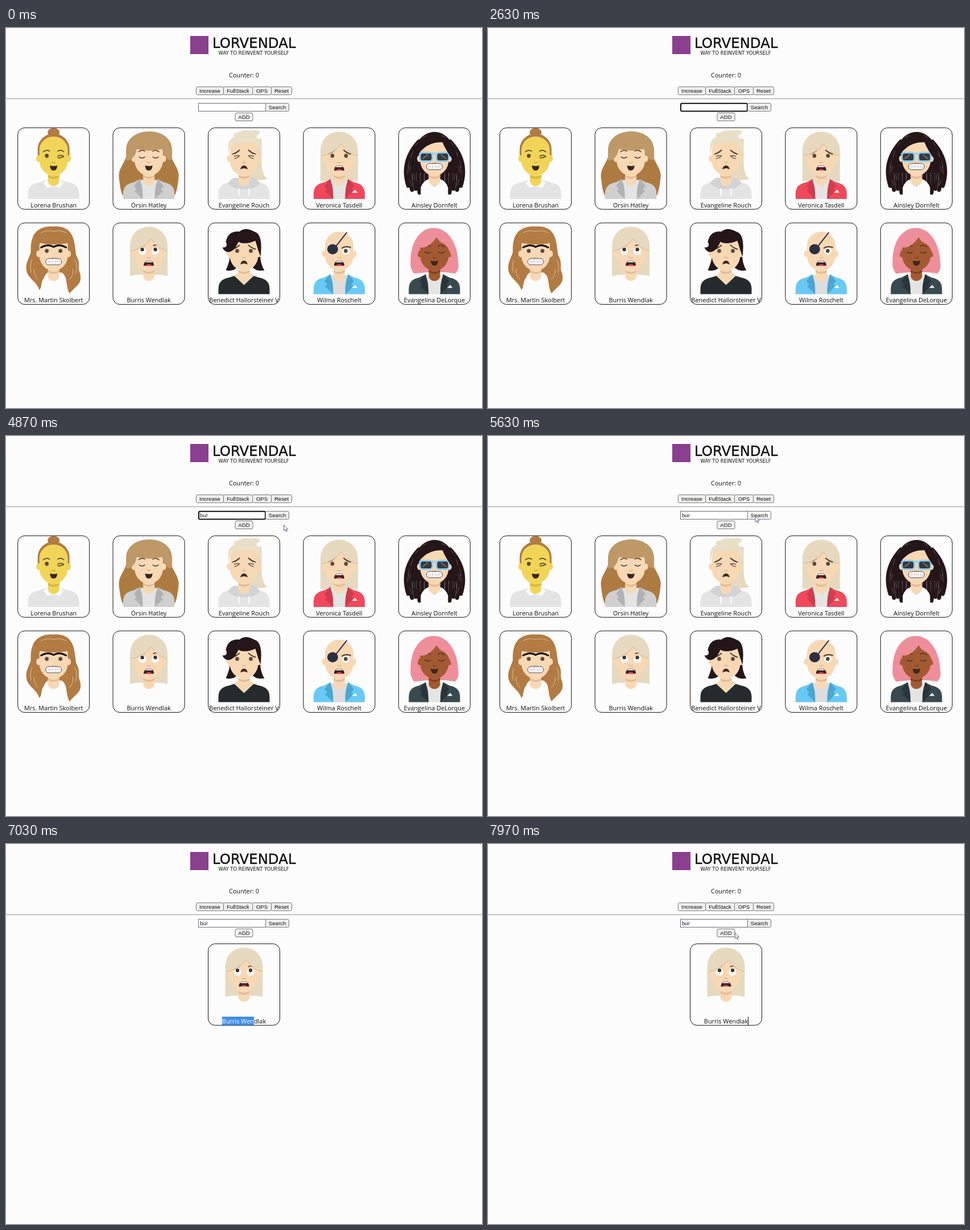
An HTML page that plays this animation: 837 by 669 pixels, repeating every 8 s.

```html
<!DOCTYPE html>
<html lang="en">
<head>
<meta charset="utf-8">
<title>User cards</title>
<style>
html, body { margin: 0; width: 100%; height: 100%; overflow: hidden; background: #fcfcfc; }
svg { display: block; width: 837px; height: 669px; }
text { font: 10.9px "Open Sans", "Noto Sans", sans-serif; fill: #111; white-space: pre; }
.ui { font: 9.65px "Liberation Sans", Arial, sans-serif; }
.brand { font-family: "DejaVu Sans", sans-serif; }
.btn { fill: #efefef; stroke: #767676; }
</style>
</head>
<body>
<svg id="stage" viewBox="0 0 837 669"></svg>
<script>
const $ = id => document.getElementById(id);
const INK = '#40332c', PALE = '#f7d8b5', BLOND = '#e6d9bf', BROWN = '#b27b43', BLACK = '#241619', GREY = '#e4e4e4';

// Shape helpers; avatars are drawn around x = 0 with y measured from the card's top
const area = (d, fill) => `<path d="${d}" fill="${fill}"/>`;
const line = (d, color = INK, w = 1.4) => `<path d="${d}" fill="none" stroke="${color}" stroke-width="${w}" stroke-linecap="round"/>`;
const oval = (x, y, rx, ry, fill) => `<ellipse cx="${x}" cy="${y}" rx="${rx}" ry="${ry}" fill="${fill}"/>`;
const flip = s => `<g transform="scale(-1 1)">${s}</g>`;
const both = s => s + flip(s);

const body = c => area('M-45 126V117Q-45 100 -27 97L-11 92Q0 106 11 92L27 97Q45 100 45 117V126z', c);
const blazer = (c, lapel, shirt) => body(shirt) + both(
  area('M-45 126V117Q-45 100 -27 97L-15 91L-10 126z', c) +
  area('M-16 91L-26 103L-21 109L-25 112L-11 126Q-9 108 -16 91z', lapel));
const pocket = area('M22 115L28 110L32 115z', '#fff');

const head = (skin = PALE, shade = '#e3bd96') =>
  area('M-10 74V94a10 9 0 0 0 20 0V74z', skin) +
  area('M-10 84Q0 90 10 84V87Q0 94 -10 87z', shade) +
  both(oval(-26, 55, 4.5, 6, skin)) +
  area('M-25 40V58a25 27 0 0 0 50 0V40a25 24 0 0 0 -50 0z', skin) +
  area('M-4 60Q0 62 4 60Q3 64 0 63Q-3 64 -4 60z', shade);

const dot = x => oval(x, 50, 3.4, 3.4, '#594a3f');
const dots = dot(-12) + dot(12);
const browsUp = both(line('M-18 43Q-12 38 -7 42'));
const browsSad = both(line('M-20 47Q-13 45 -8 40', INK, 1.8));
const shut = both(line('M-17 52Q-12 56 -7 52'));
const squint = both(line('M-17 55Q-11 54 -8 50Q-13 49 -17 51', INK, 1.2));
const rolled = x => oval(x, 50.5, 6.5, 6.5, '#fff') + oval(x, 47.5, 3.2, 3.2, INK);

const laugh = area('M-6.5 67Q0 69 6.5 67Q6 76 0 76Q-6 76 -6.5 67z', '#3a2622');
const frown = area('M-6.5 74Q-5 67 0 67Q5 67 6.5 74Q0 70 -6.5 74z', '#3a2622');
const gasp = area('M-9 76Q-9 67 0 67Q9 67 9 76z', '#3a2225') +
  area('M-6 69Q0 66 6 69V70H-6z', '#fff') + area('M-6 76Q0 70 6 76z', '#e83e5d');
const teeth = `<rect x="-14" y="63.5" width="28" height="11" rx="5.5" fill="#fff" stroke="#574a45"/>` +
  line('M-13 69H13M-8 64V74M-3 64V74M3 64V74M8 64V74', '#bbb', .7);

const straightBack = area('M-33 94V42C-33 -4 33 -4 33 42V94z', BLOND);
const straightFringe = area('M-32 52V40C-32 -1 32 -1 32 42V50Q12 44 5 28Q-8 46 -32 52z', BLOND) +
  line('M-31 50Q-8 45 4 29L10 36', '#c6ad87', .8) + line('M14 40Q22 48 31 49', '#c6ad87', .8);

const dreads = () => {
  let s = area('M-40 80C-48 -16 48 -16 40 80z', BLACK);
  for (let i = 0; i < 15; i++) {
    const x = -46 + i * 6.6, y = 122 - Math.abs(i - 7) % 3 * 7 - (Math.abs(i - 7) > 5 ? 12 : 0);
    s += line(`M${x * .6} 25Q${x * 1.3} 60 ${x} ${y}`, BLACK, 7);
  }
  return s;
};
const dreadShine = both(line('M-38 42L-41 52M-42 68L-44 78M-36 82L-35 92M-44 92L-40 102M-33 32L-29 26M-20 18L-13 14', '#6b5757', .9));

const shades = line('M-27 46H27', '#8ccdf0', 2.5) + both(
  `<rect x="-25.5" y="44.5" width="22" height="15" rx="5" fill="#38383b" stroke="#8ccdf0" stroke-width="3"/>` +
  line('M-20 55L-12 48', '#707070', 2));

const avatars = [
  oval(0, 9, 10.5, 8, BROWN) + area('M-28 54V38a28 27 0 0 1 56 0V54z', BROWN) + body(GREY) +
    area('M-18 98L-11 92Q0 106 11 92L18 98L10 107Q0 100 -10 107z', '#fafafa') + head('#f1d558', '#d8b53b') +
    dot(-12) + line('M7 51Q12 47 18 51M8 54L17 52') + browsUp + laugh,

  area('M-38 40C-38 62 -56 70 -52 92C-50 108 -48 122 -40 125H40C48 122 50 108 52 92C56 70 38 62 38 40z', '#ad7b42') +
    blazer('#cfcfd0', '#b1b1b3', GREY) + head() + shut + browsUp + laugh +
    area('M-40 58V40C-40 -4 41 -4 41 40V58C30 58 27 47 23 38Q0 44 -21 38C-24 50 -28 58 -40 58z', '#be9866'),

  area('M0 20H31V66Q32 84 41 91Q25 95 10 90z', BLOND) + body(GREY) +
    area('M-28 98Q-20 86 -10 89Q0 108 10 89Q20 86 28 98Q15 112 0 108Q-15 112 -28 98z', '#d3d3d5') +
    line('M-9 108V120M9 108V120', '#fff', 2) + head() + squint + browsSad + frown +
    area('M-28 52V36Q-28 20 -17 17Q-21 10 -10 9Q0 3 14 6Q24 2 28 9Q26 14 20 15Q31 22 31 52Q27 32 16 24Q-10 30 -22 27Q-27 38 -28 52z', '#e9dfc8'),

  straightBack + blazer('#f2485c', '#cf3c4e', GREY) + pocket + head() + dots + browsSad + gasp + straightFringe,

  dreads() + area('M-24 126V106Q-20 94 -10 91L0 104L10 91Q20 94 24 106V126z', '#fcfcfc') + head() + shades + teeth +
    area('M-32 56C-38 0 38 0 32 56Q22 44 14 26Q-8 26 -20 38Q-28 44 -32 56z', BLACK) + dreadShine,

  area('M0 7C-42 5 -40 40 -40 52C-44 66 -52 74 -46 90C-38 104 -30 104 -25 119C-14 104 -20 94 -10 88H14C26 96 20 110 28 125C40 110 52 108 46 88C42 78 48 72 40 58C36 40 40 5 0 7z', BROWN) +
    area('M-22 126Q-24 98 -10 91H10Q24 98 22 126z', '#fcfcfc') + head() + dots +
    line('M-22 44Q-10 37 0 43Q10 37 22 44', '#17110f', 3) + teeth +
    area('M-34 58C-42 -6 42 -6 34 58Q28 50 26 36Q0 41 -24 36Q-28 50 -34 58z', BROWN) +
    both(line('M-38 66Q-43 76 -39 88M-34 82Q-36 92 -28 100M-22 18Q-10 12 0 16', '#e3c799', .9)),

  straightBack + area('M-45 126V117Q-43 93 -20 92H20Q43 93 45 117V126z', '#fcfcfc') + head() +
    rolled(-11.5) + rolled(11.5) + both(line('M-21 44Q-14 37 -8 41', INK, 1.6)) + gasp + straightFringe,

  area('M-26 30C-20 50 -26 72 -32 84Q-20 87 -10 78H14Q22 87 36 84Q27 72 28 40z', BLACK) +
    body('#252b2d') + area('M-17 94L-10 87H10L17 94L0 110z', PALE) + head() + dots + browsSad + frown +
    area('M-38 44Q-27 44 -32 34Q-28 14 -8 16Q2 7 18 16Q34 20 29 60Q24 46 20 32Q2 40 -10 34Q-16 50 -27 52Q-34 52 -38 44z', BLACK),

  blazer('#68c9f5', '#4ba7d2', '#dcdcdc') + pocket + head() + line('M-5 41L13 18', '#2b3040', 2) +
    oval(-11.5, 47, 9.5, 9, '#2b3040') + oval(11.5, 50.5, 6.5, 6, '#fff') + dot(11.5) +
    line('M5 45Q12 41 20 44', INK, 2) + gasp,

  area('M-42 70C-42 -12 40 -10 42 72Q44 84 36 90Q10 84 -36 90Q-43 80 -42 70z', '#ef8e9b') +
    blazer('#3a4950', '#29353b', GREY) + pocket + head('#a35a32', '#814222') + shut + browsUp + laugh +
    area('M-30 60Q-36 12 0 11Q36 12 30 62Q28 46 18 38Q8 34 4 26Q-10 46 -26 44z', '#ef8e9b')
];

const names = ['Lorena Brushan', 'Orsin Hatley', 'Evangeline Rouch', 'Veronica Tasdell', 'Ainsley Dornfelt',
  'Mrs. Martin Skolbert', 'Burris Wendlak', 'Benedict Hallorsteiner V', 'Wilma Roschelt', 'Evangelina DeLorque'];
const FOUND = 6, query = 'bur';

const card = (i, col, row, label = names[i]) => `<g transform="translate(${83.7 + col * 167.4} ${175 + row * 167.4})">
  ${avatars[i]}<rect x="-63" y=".7" width="126" height="143.5" rx="12" fill="none" stroke="#111"/>
  <rect id="mark${row}${col}" y="129" height="15" fill="#3b8fe8"/>
  <text y="141" text-anchor="middle">${label}</text></g>`;

const button = (x, y, w, label, id = label) => `<rect id="${id}" class="btn" x="${x}" y="${y}" width="${w}" height="14" rx="2"/>
  <text class="ui" x="${x + w / 2}" y="${y + 10.3}" text-anchor="middle">${label}</text>`;

$('stage').innerHTML = `
  <rect x="324" y="14" width="32" height="32" fill="#8a3f8f"/>
  <text class="brand" x="363" y="35" style="font-size:24.4px" stroke="#111" stroke-width=".4">LORVENDAL</text>
  <text class="brand" x="373.5" y="47" style="font-size:8.45px">WAY TO REINVENT YOURSELF</text>
  <text x="418.5" y="87" text-anchor="middle">Counter: 0</text>
  ${button(334.5, 103.5, 48, 'Increase')}${button(382.5, 103.5, 51, 'FullStack')}
  ${button(433.5, 103.5, 33, 'OPS')}${button(466.5, 103.5, 36, 'Reset')}
  <rect y="124" width="837" height="1" fill="#979797"/>
  <rect id="field" y="132.5" height="14" fill="#fff"/>
  <text id="typed" class="ui" x="341" y="143"></text>
  ${button(456.5, 132.5, 41, 'Search')}${button(403, 149.5, 31, 'ADD')}
  <g id="all">${names.map((n, i) => card(i, i % 5, i / 5 | 0)).join('')}</g>
  <g id="one">${card(FOUND, 2, 0, '<tspan id="picked" fill="#fff"></tspan><tspan id="rest"></tspan>').replace('mark02', 'mark')}</g>
  <rect id="caret" width="1" fill="#111"/>
  <path id="mouse" d="M0 0V10L2.5 7.8L4 11.5L5.7 10.8L4.1 7.3H7.3z" fill="#fff" stroke="#55506e" stroke-width=".9"/>`;

const show = (id, on) => $(id).style.display = on ? '' : 'none';
const set = (id, o) => Object.entries(o).forEach(([k, v]) => $(id).setAttribute(k, v));

// Pointer path as [time, x, y]; a gap between legs means an I-beam that does not show
const legs = [
  [[4560, 458, 148], [4750, 500, 163], [5000, 476, 150], [5400, 470, 141.5], [6130, 470, 141.5], [6450, 492, 235], [6700, 420, 322], [6880, 374, 312]],
  [[7500, 470, 305], [7700, 456, 230], [7900, 435, 160], [8000, 434, 155.5]]
];
const mouseAt = t => {
  const leg = legs.find(l => t >= l[0][0] && t < l[l.length - 1][0]);
  if (!leg) return null;
  const i = leg.findIndex(p => p[0] > t), a = leg[i - 1], b = leg[i];
  let u = (t - a[0]) / (b[0] - a[0]);
  u = u * u * (3 - 2 * u);
  return [a[1] + (b[1] - a[1]) * u, a[2] + (b[2] - a[2]) * u];
};

const keys = [2900, 2970, 3330];
const blinkOn = (t, since) => (t - since) % 800 < 400;

function draw(t) {
  const focus = t >= 1500 && t < 5600, found = t >= 5770;
  const count = keys.filter(k => t >= k).length;

  $('typed').textContent = query.slice(0, count);
  set('field', focus
    ? { x: 339, y: 132.8, width: 117, height: 13.6, rx: 2, stroke: '#101010', 'stroke-width': 2 }
    : { x: 338.5, y: 132.5, width: 118, height: 14, rx: 0, stroke: '#6d6b7c', 'stroke-width': 1 });

  const pressed = t >= 5600 && t < 5770, hover = t >= 4950 && t < 6180;
  $('Search').style.fill = pressed ? '#f5f5f5' : hover ? '#e2e2e5' : '';
  $('Search').style.stroke = found && hover ? '#3c3c4c' : '';

  show('all', !found);
  show('one', found);

  // Drag over the name, one letter at a time
  const name = names[FOUND];
  const picked = t >= 6930 && t < 7170 ? Math.min(name.length, Math.floor((t - 6930) / 10)) : 0;
  $('picked').textContent = name.slice(0, picked);
  $('rest').textContent = name.slice(picked);
  let end = 457;
  if (found) {
    const width = $('rest').parentNode.getComputedTextLength();
    end = 418.5 + width / 2;
    set('mark', { x: -width / 2, width: picked ? $('picked').getComputedTextLength() : 0 });
  }

  let caret = null;
  if (t >= 1400 && t < 1500) caret = [512, 0, 62];
  else if (focus && blinkOn(t, count ? keys[count - 1] : 1430)) caret = [341 + $('typed').getComputedTextLength(), 134.5, 10.5];
  else if (t >= 7170 && blinkOn(t, 7170)) caret = [end, 304, 15];
  show('caret', caret);
  if (caret) set('caret', { x: Math.round(caret[0]), y: caret[1], height: caret[2] });

  const m = mouseAt(t);
  show('mouse', m);
  if (m) set('mouse', { transform: `translate(${m})` });
}

(function tick() {
  draw(performance.now() % 8000);
  requestAnimationFrame(tick);
})();
</script>
</body>
</html>
```
